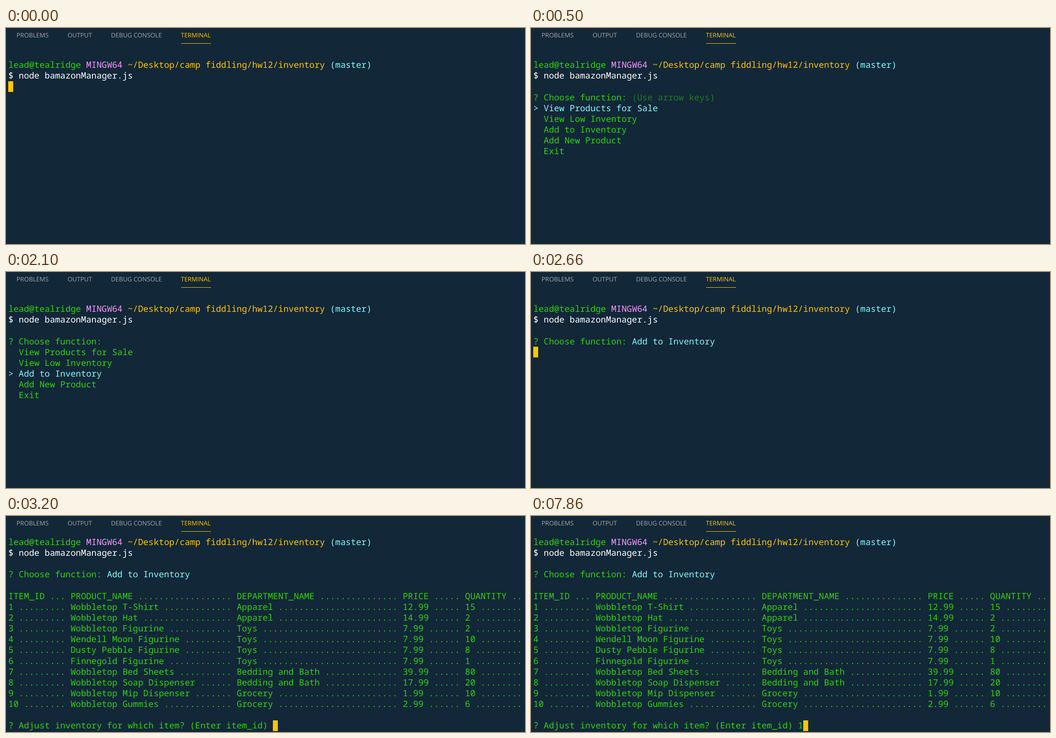
An HTML page that plays this animation: 1159x483 px, repeating every 8000 ms.

```html
<!DOCTYPE html>
<html lang="en">
<head>
<meta charset="utf-8">
<title>Inventory terminal</title>
<style>
  html, body { margin: 0; width: 100%; height: 100%; overflow: hidden; background: #122738; }
  svg { display: block; width: 100%; height: 100%; }
  text { white-space: pre; text-rendering: geometricPrecision; }
  #tabs { font: 13.85px "Open Sans", "Noto Sans", sans-serif; fill: #a4a8ab; }
  #screen { font: 19.32px "Noto Sans Mono", "DejaVu Sans Mono", monospace; }
</style>
</head>
<body>
<svg viewBox="0 0 1159 483" xmlns="http://www.w3.org/2000/svg">
  <rect width="1159" height="483" fill="#122738"/>
  <g id="tabs">
    <text x="23.5" y="21">PROBLEMS</text>
    <text x="137.5" y="21">OUTPUT</text>
    <text x="234.5" y="21">DEBUG CONSOLE</text>
    <text x="390.5" y="21" fill="#ffc600">TERMINAL</text>
    <rect x="391" y="34" width="67" height="1" fill="#ffc600"/>
  </g>
  <g id="screen"></g>
</svg>
<script>
const LOOP = 8000;
const LEFT = 5.2, TOP = 46.7, CELL_W = 11.59, CELL_H = 24.14, BASELINE = 18.3;
const GREEN = '#30d30c', CYAN = '#80fcff', PINK = '#fb94ff', YELLOW = '#ffc600', WHITE = '#ffffff';

const screen = document.getElementById('screen');

function add(tag, attrs, content = '') {
  const node = document.createElementNS('http://www.w3.org/2000/svg', tag);
  for (const key in attrs) node.setAttribute(key, attrs[key]);
  node.textContent = content;
  screen.append(node);
}

function write(row, col, content, fill = GREEN, opacity = 1) {
  const x = LEFT + col * CELL_W;
  const y = TOP + row * CELL_H + BASELINE;
  add('text', { x, y, fill, opacity }, content);
}

function cursor(row, col) {
  add('rect', {
    x: Math.round(LEFT + col * CELL_W), y: Math.round(TOP + row * CELL_H),
    width: 11, height: 24, fill: YELLOW
  });
}

function shell(row) {
  write(row, 0, 'lead@tealridge');
  write(row, 15, 'MINGW64', PINK);
  write(row, 23, '~/Desktop/camp fiddling/hw12/inventory', YELLOW);
  write(row, 62, '(master)', CYAN);
  write(row + 1, 0, '$ node bamazonManager.js', WHITE);
}

const QUESTION = '? Choose function:';
const CHOICES = ['View Products for Sale', 'View Low Inventory', 'Add to Inventory', 'Add New Product', 'Exit'];

function menu(selected, hint) {
  shell(1);
  write(4, 0, QUESTION);
  if (hint) write(4, 19, '(Use arrow keys)', GREEN, 0.5);
  CHOICES.forEach((choice, i) => {
    const active = i === selected;
    write(5 + i, 0, (active ? '> ' : '  ') + choice, active ? CYAN : GREEN);
  });
}

function answered(row) {
  shell(row);
  write(row + 3, 0, QUESTION);
  write(row + 3, 19, CHOICES[2], CYAN);
}

const WIDTHS = [12, 32, 32, 12, 12];
const TABLE = [
  ['ITEM_ID', 'PRODUCT_NAME', 'DEPARTMENT_NAME', 'PRICE', 'QUANTITY'],
  ...[
    ['Wobbletop T-Shirt', 'Apparel', '12.99', 15],
    ['Wobbletop Hat', 'Apparel', '14.99', 2],
    ['Wobbletop Figurine', 'Toys', '7.99', 2],
    ['Wendell Moon Figurine', 'Toys', '7.99', 10],
    ['Dusty Pebble Figurine', 'Toys', '7.99', 8],
    ['Finnegold Figurine', 'Toys', '7.99', 1],
    ['Wobbletop Bed Sheets', 'Bedding and Bath', '39.99', 80],
    ['Wobbletop Soap Dispenser', 'Bedding and Bath', '17.99', 20],
    ['Wobbletop Mip Dispenser', 'Grocery', '1.99', 10],
    ['Wobbletop Gummies', 'Grocery', '2.99', 6]
  ].map((item, i) => [i + 1, ...item])
];

function table(row) {
  answered(row);
  TABLE.forEach((cells, i) => {
    let col = 0;
    cells.forEach((cell, j) => {
      write(row + 5 + i, col, (cell + ' ').padEnd(WIDTHS[j] - 1, '.'));
      col += WIDTHS[j];
    });
  });
}

function ask(typed) {
  const prompt = '? Adjust inventory for which item? (Enter item_id) ' + typed;
  table(0);
  write(17, 0, prompt);
  cursor(17, prompt.length);
}

const SCENES = [
  [0, () => { shell(1); cursor(3, 0); }],
  [500, () => menu(0, true)],
  [1440, () => menu(1)],
  [2100, () => menu(2)],
  [2660, () => { answered(1); cursor(5, 0); }],
  [2790, () => { table(1); cursor(17, 0); }],
  [3200, () => ask('')],
  [7860, () => ask('1')]
];

let shown = null;

function render(time) {
  const scene = SCENES.findLast(([start]) => start <= time);
  if (scene === shown) return;
  shown = scene;
  screen.replaceChildren();
  scene[1]();
}

const began = performance.now();
function tick() {
  render((performance.now() - began) % LOOP);
  requestAnimationFrame(tick);
}
tick();
</script>
</body>
</html>
```
